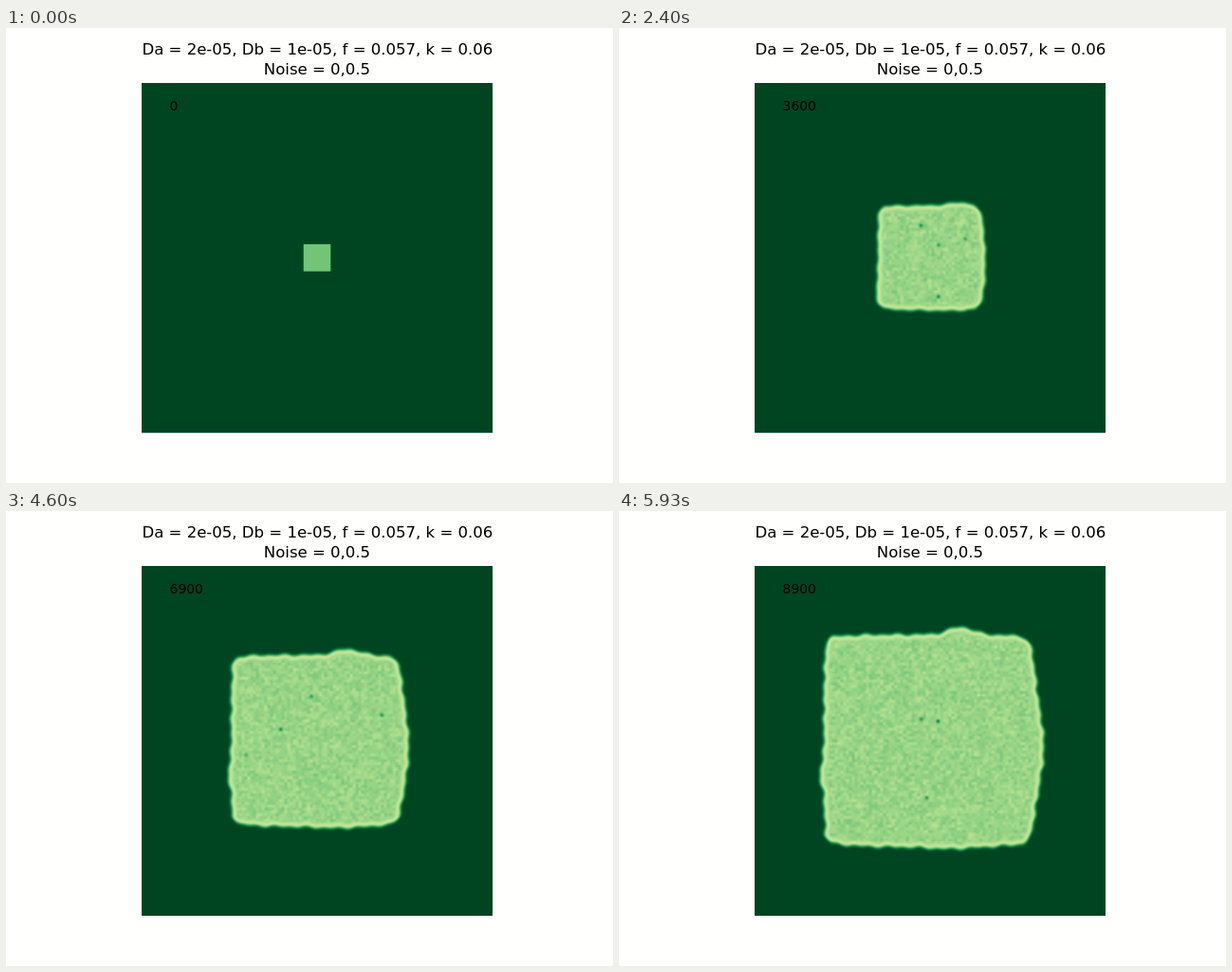
Animation, 640 px wide and 480 px high, one loop 6000 ms. Source, as an HTML page with a canvas:

```html
<!DOCTYPE html>
<html lang="en">
<head>
<meta charset="utf-8">
<title>Gray-Scott growth</title>
<style>
html, body { margin: 0; width: 100%; height: 100%; overflow: hidden; background: #fffffd; }
canvas { position: absolute; left: 143px; top: 58px; }
svg { position: absolute; left: 0; top: 0; }
text { font-family: "DejaVu Sans", sans-serif; font-size: 16.55px; text-anchor: middle; }
#count { font-size: 13.889px; text-anchor: start; }
</style>
</head>
<body>
<canvas id="field" width="370" height="369"></canvas>
<svg width="640" height="480">
  <text x="328.4" y="28">Da = 2e-05, Db = 1e-05, f = 0.057, k = 0.06</text>
  <text x="328" y="49">Noise = 0,0.5</text>
  <text id="count" x="172.6" y="87">0</text>
</svg>
<script>
const LOOP = 6000, STEPS = 90, W = 370, H = 369, CX = 185, CY = 184.4;
const field = document.getElementById('field').getContext('2d');
const count = document.getElementById('count');
const img = field.createImageData(W, H);

const clamp = (v, lo, hi) => Math.min(hi, Math.max(lo, v));
const mix = (a, b, t) => a + (b - a) * t;
const ease = t => t * t * (3 - 2 * t);
const bell = x => Math.exp(-x * x);

// Dark green to pale yellow, looked up by concentration.
const STOPS = ['004521', '006837', '238443', '41ab5d', '78c679', 'addd8e', 'd9f0a3', 'f7fcb9', 'ffffe5']
  .map(hex => [0, 2, 4].map(i => parseInt(hex.slice(i, i + 2), 16)));
const RAMP = Array.from({ length: 256 }, (_, i) => {
  const t = i / 255 * 8, k = Math.min(7, t | 0);
  return STOPS[k].map((c, j) => mix(c, STOPS[k + 1][j], t - k));
});

// Each side bulges around one place and falls back towards its corners.
const SIDES = {
  top: { mid: CX, at: 32, rise: 8, width: 18, taper: 3, phase: 1 },
  right: { mid: CY, at: 6, rise: 8, width: 45, taper: 9, phase: 5.2 },
  bottom: { mid: CX, at: 20, rise: 2, width: 30, taper: 5, phase: 2.4 },
  left: { mid: CY, at: 35, rise: 4, width: 16, taper: 3, phase: 4 }
};

function random(seed) {
  let a = seed * 7919 + 17;
  return () => {
    a = a + 0x6D2B79F5 | 0;
    let t = Math.imul(a ^ a >>> 15, 1 | a);
    t = t + Math.imul(t ^ t >>> 7, 61 | t) ^ t;
    return ((t ^ t >>> 14) >>> 0) / 4294967296;
  };
}

// Distance of a side from the centre at every pixel along it.
function edge({ mid, at, rise, width, taper, phase }, step, half) {
  const age = step / STEPS;
  return Float32Array.from({ length: W }, (_, p) => {
    const s = p + 0.5 - mid, u = clamp(s / half, -1, 1);
    const wave = Math.sin(s * 0.36 + phase) + Math.sin(s * 0.21 + phase * 3);
    return half + age * (rise * bell((s - at) / width) - taper * u ** 4) + 0.6 * Math.sqrt(age) * wave;
  });
}

// Fine noise with a few deep pits.
function speckle(step, half) {
  const rnd = random(step + 1), n = 128, cell = 3;
  const grid = Float32Array.from({ length: n * n }, () => rnd() + rnd() - 1);
  const pits = Array.from({ length: 3 + rnd() * 4 | 0 }, () => ({
    x: (rnd() * 2 - 1) * half, y: (rnd() * 2 - 1) * half, depth: 0.1 + rnd() * 0.2
  }));
  return (x, y) => {
    const gx = x / cell + n / 2, gy = y / cell + n / 2, i = gx | 0, j = gy | 0, u = gx - i, q = j * n + i;
    let v = 0.09 * mix(mix(grid[q], grid[q + 1], u), mix(grid[q + n], grid[q + n + 1], u), gy - j);
    for (const p of pits) {
      const r = Math.hypot(x - p.x, y - p.y);
      if (r < 6) v -= p.depth * bell(r / 2.2);
    }
    return v;
  };
}

function paint(step) {
  const half = 13.6 + 1.075 * step, reach = half + 18;
  const top = edge(SIDES.top, step, half), bottom = edge(SIDES.bottom, step, half);
  const left = edge(SIDES.left, step, half), right = edge(SIDES.right, step, half);
  const noise = speckle(step, half);
  const grown = Math.min(1, step / 8);
  const level = mix(0.49, 0.575, grown), blur = mix(1.5, 6.5, grown), radius = 0.01 + 6 * grown;

  const level0 = (x, y, px, py) => {
    if (Math.abs(x) > reach || Math.abs(y) > reach) return 0;
    const a = Math.min(x + left[py], right[py] - x), b = Math.min(y + top[px], bottom[px] - y);
    const d = a < radius && b < radius ? radius - Math.hypot(radius - a, radius - b) : Math.min(a, b);
    if (d < -blur) return 0;
    const inner = grown * clamp((d - 1) / 4, 0, 1);
    return level * ease(clamp(d / blur + 1, 0, 1)) + 0.1 * grown * bell(d / 2.4) +
      (inner && inner * noise(x, y));
  };

  for (let y = 0, o = 0; y < H; y++) {
    for (let x = 0; x < W; x++, o += 4) {
      const v = level0(x + 0.5 - CX, y + 0.5 - CY, x, y);
      const c = RAMP[clamp(Math.round(v * 255), 0, 255)];
      img.data[o] = c[0];
      img.data[o + 1] = c[1];
      img.data[o + 2] = c[2];
      img.data[o + 3] = 255;
    }
  }
  field.putImageData(img, 0, 0);
  count.textContent = step * 100;
}

let shown = -1;
function tick() {
  const step = Math.floor((performance.now() % LOOP + 3.4) * STEPS / LOOP) % STEPS;
  if (step !== shown) paint(shown = step);
  requestAnimationFrame(tick);
}
tick();
</script>
</body>
</html>
```
